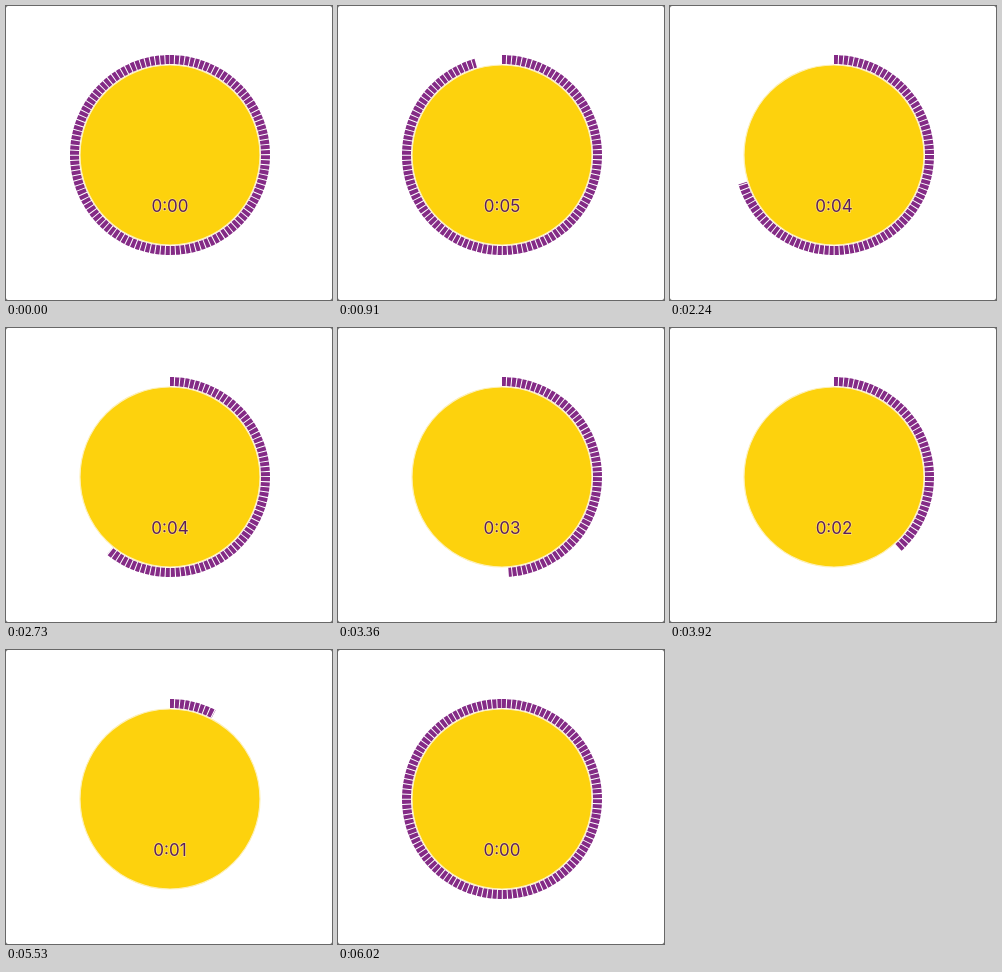
Animation of 326 by 294 pixels, one loop 6230 ms. Source, as an HTML page:

```html
<!DOCTYPE html>
<html lang="en">
<head>
<meta charset="utf-8">
<title>Countdown dial</title>
<style>
  html, body { margin: 0; width: 100%; height: 100%; overflow: hidden; background: #555; }
  svg { display: block; }
  .ring { fill: none; stroke: #842b86; stroke-width: 9; stroke-dasharray: 4 1; }
  .face { fill: #fdd20d; stroke: #fdf0b8; stroke-width: 1.2; }
  .time {
    font: 17px Inter, Roboto, "Liberation Sans", sans-serif;
    text-anchor: middle;
    fill: #5a1f5c;
    stroke: rgba(255, 238, 200, .5);
    stroke-width: 1.6;
    paint-order: stroke;
  }
</style>
</head>
<body>
<svg width="326" height="294" viewBox="0 0 326 294">
  <rect width="326" height="294" rx="2" fill="#fff"/>
  <circle class="face" cx="164" cy="149" r="90"/>
  <path class="ring" id="ring"/>
  <text class="time" id="time" x="164" y="205.5">0:00</text>
</svg>
<script>
  const LOOP = 6230, STEP = 70, LAST = 6020;
  const LABEL_ON = 560, START = 677, RUN = 5250, SECONDS = 5;
  const CX = 164, CY = 149, R = 95.5;

  const ring = document.getElementById('ring');
  const label = document.getElementById('time');

  // Arc clockwise from twelve o'clock covering the given share of the circle.
  function arc(share) {
    const a = Math.min(share, 0.99999) * 2 * Math.PI;
    const x = CX + R * Math.sin(a), y = CY - R * Math.cos(a);
    return `M${CX} ${CY - R}A${R} ${R} 0 ${a > Math.PI ? 1 : 0} 1 ${x} ${y}`;
  }

  function draw(now) {
    const t = Math.min(Math.floor((now % LOOP) / STEP) * STEP, LAST);
    const done = t >= START + RUN;
    const left = done ? 1 : Math.min(1, 1 - (t - START) / RUN);
    const secs = done || t < LABEL_ON ? 0 : Math.ceil(left * SECONDS);
    ring.setAttribute('d', arc(left));
    label.textContent = '0:0' + secs;
  }

  const origin = performance.now();
  function tick() {
    draw(performance.now() - origin);
    requestAnimationFrame(tick);
  }
  tick();
</script>
</body>
</html>
```
